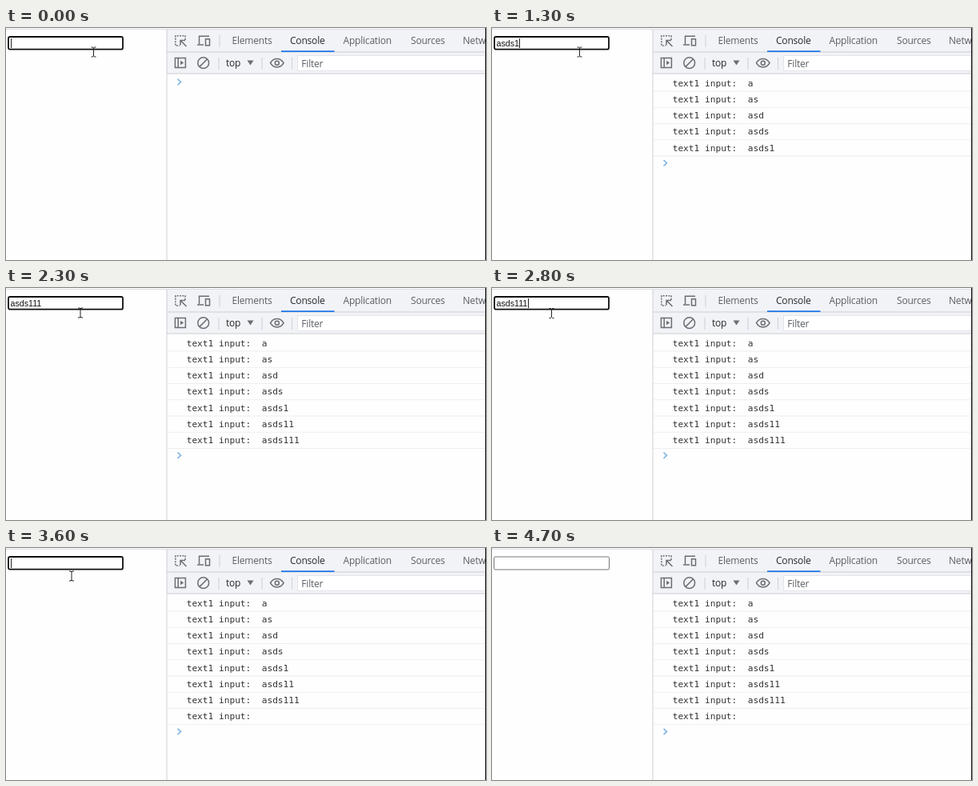
Animation of 600x290 px, one loop 4.8 s. Source, as an HTML page:

```html
<!DOCTYPE html>
<html lang="en">
<head>
<meta charset="utf-8">
<title>Input event log</title>
<style>
  html, body { margin: 0; width: 100%; height: 100%; overflow: hidden; background: #fefefe; }
  svg { display: block; width: 600px; height: 290px; }
  text { white-space: pre; }
  .ui { font: 12px "Open Sans", "Noto Sans", sans-serif; letter-spacing: -.2px; fill: #5a5e63; }
  .dark { fill: #27292c; }
  .log { font: 11.17px "DejaVu Sans Mono", "Noto Sans Mono", monospace; fill: #303134; }
  .field { font: 10.7px "Liberation Sans", Arial, sans-serif; fill: #111; }
  .icon { fill: none; stroke: #6a6e73; stroke-width: 1.5; }
  .rule { fill: #cdd0d6; }
</style>
</head>
<body>
<svg viewBox="0 0 600 290">
  <!-- page -->
  <rect y="1" width="600" height="1" fill="#d9dce1"/>
  <rect id="box" fill="#fff"/>
  <rect id="mark" x="5.5" y="13" height="13" fill="#0078d7"/>
  <text id="value" class="field" x="5.5" y="23"></text>
  <rect id="caret" y="13" width="1" height="12" fill="#222"/>

  <!-- developer tools -->
  <rect x="201" y="2" width="398" height="55" fill="#f2f3f7"/>
  <rect class="rule" x="201" y="29.5" width="398" height="1"/>
  <rect class="rule" x="201" y="56.5" width="398" height="1"/>
  <rect class="rule" x="200.5" y="2" width="1" height="288"/>
  <rect x="344" y="28.3" width="66.5" height="1.7" fill="#1a73e8"/>
  <g class="ui">
    <text x="282.5" y="20">Elements</text>
    <text x="355" y="20" class="dark">Console</text>
    <text x="421.5" y="20">Application</text>
    <text x="506" y="20">Sources</text>
    <text x="571" y="20">Network</text>
    <text x="275" y="47.7" class="dark">top</text>
  </g>
  <rect x="364.5" y="34.5" width="240" height="19" fill="#fff" stroke="#e3e5ea"/>
  <text class="ui" x="369.3" y="48.6">Filter</text>
  <g class="rule">
    <rect x="266.5" y="9" width="1" height="15"/>
    <rect x="265.5" y="37" width="1" height="15"/>
    <rect x="319.5" y="37" width="1" height="15"/>
    <rect x="357" y="37" width="1" height="15"/>
  </g>
  <g class="icon">
    <path d="M224 15V9.8H211.8V22H217" stroke-dasharray="2 1.4"/>
    <path d="M218 21.5V15.5H224M218.5 16L225.5 23"/>
    <path d="M254 10.2H241.5V20M239 21H247"/>
    <rect x="249.5" y="13.8" width="5" height="8"/>
    <rect x="211.4" y="37.5" width="13" height="12"/>
    <path d="M215.2 37.5V49.5"/>
    <circle cx="246.7" cy="43.7" r="6.9"/>
    <path d="M241.8 48.6L251.6 38.8"/>
    <path d="M330.5 43.7C334 36.7 343.5 36.7 347 43.7C343.5 50.7 334 50.7 330.5 43.7Z"/>
    <circle cx="338.8" cy="43.7" r="2.5"/>
  </g>
  <path d="M218.1 40.7L222.1 43.5L218.1 46.3Z" fill="#6a6e73"/>
  <path d="M301.5 40.5H309.5L305.5 46.5Z" fill="#6a6e73"/>
  <g id="rows"></g>
  <path id="prompt" d="M214.5 63.7L218.5 67.5L214.5 71.3" fill="none" stroke="#74aee2" stroke-width="1.5"/>

  <g id="mouse" fill="none" stroke="#222">
    <path d="M-3 -6H-1L0 -5L1 -6H3M0 -5V5M-3 6H-1L0 5L1 6H3"/>
  </g>
  <rect x="599" width="1" height="290" fill="#111"/>
</svg>
<script>
  const LOOP = 4800, ROW = 20.25;
  const $ = id => document.getElementById(id);
  const set = (el, attrs) => { for (const k in attrs) el.setAttribute(k, attrs[k]); };
  const show = (el, on) => { el.style.display = on ? "" : "none"; };

  // Each input event: time and resulting value
  const edits = [[100, "a"], [200, "as"], [300, "asd"], [400, "asds"],
    [1300, "asds1"], [1500, "asds11"], [1700, "asds111"], [3600, ""]];
  const moves = [[0, 109.5, 30], [2200, 102, 31], [2300, 93, 31], [2400, 85, 32],
    [2500, 79, 32], [2700, 76, 31], [2800, 74.5, 31.5], [3100, 76, 33],
    [3200, 79, 34], [3300, 82, 35], [4200, 88, 48]];
  const caretOff = [[900, 1300], [2100, 2600], [3000, 3600], [4100, LOOP]];
  const BLUR = 4700, SELECT = [3000, 3600], LEAVE = 4300;
  const within = (t, [a, b]) => t >= a && t < b;
  const latest = (list, t) => list.filter(e => e[0] <= t).pop();

  const rows = edits.map(([, value], i) => {
    const y = i * ROW;
    $("rows").insertAdjacentHTML("beforeend",
      `<g><text class="log" x="225.7" y="${72.6 + y}">text1 input:  ${value}</text>` +
      `<rect x="202" y="${78.5 + y}" width="397" height="1" fill="#eeeef0"/></g>`);
    return $("rows").lastElementChild;
  });

  function draw(t) {
    const last = latest(edits, t);
    const count = edits.filter(e => e[0] <= t).length;
    const selected = within(t, SELECT), focused = t < BLUR;

    $("value").textContent = last ? last[1] : "";
    $("value").style.fill = selected ? "#fff" : "";
    const width = last && last[1] ? $("value").getComputedTextLength() : 0;
    set($("mark"), { width: selected ? width : 0 });
    set($("caret"), { x: Math.round(5.7 + width) });
    show($("caret"), !caretOff.some(span => within(t, span)));

    set($("box"), focused
      ? { x: 3, y: 11, width: 143, height: 15.7, rx: 2, stroke: "#101010", "stroke-width": 1.8 }
      : { x: 2.5, y: 11, width: 144, height: 16, rx: 1.5, stroke: "#767676", "stroke-width": 1 });

    rows.forEach((row, i) => show(row, i < count));
    set($("prompt"), { transform: `translate(0 ${count * ROW})` });

    const [, x, y] = latest(moves, t);
    set($("mouse"), { transform: `translate(${x} ${y})` });
    show($("mouse"), t < LEAVE);
  }

  const start = performance.now();
  function tick() {
    draw((performance.now() - start) % LOOP);
    requestAnimationFrame(tick);
  }
  tick();
</script>
</body>
</html>
```
